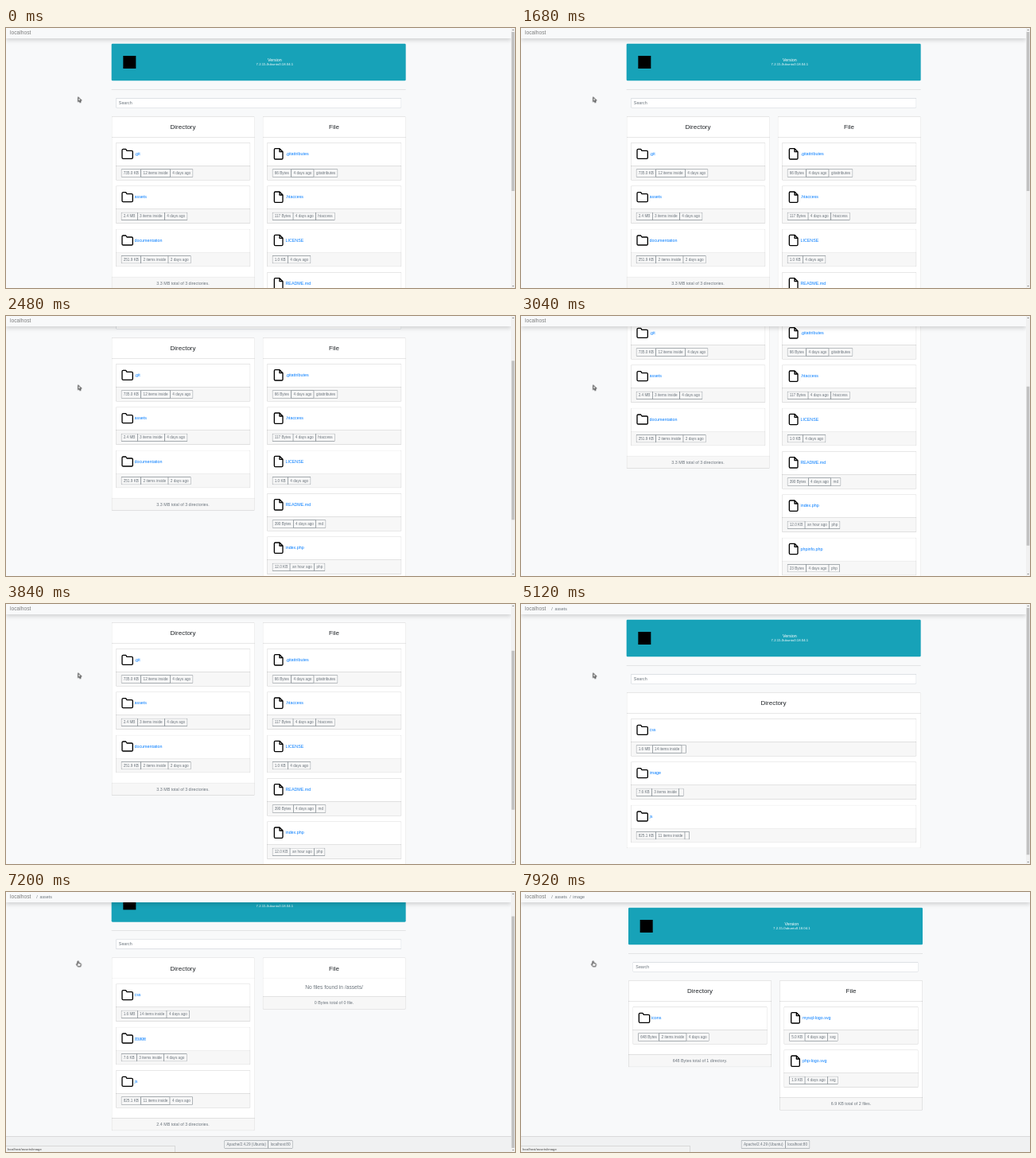
Write an HTML page that moves like this. It is 640 px wide and 327 px high and loops after 8000 ms.

```html
<!DOCTYPE html>
<html lang="en">
<head>
<meta charset="utf-8">
<title>localhost</title>
<style>
@property --scroll { syntax: "<number>"; inherits: true; initial-value: 0; }

html, body { margin: 0; width: 100%; height: 100%; overflow: hidden; background: #f8f9fa; }
/* The browser window is laid out at 1920 x 981 and shown at a third. */
#screen {
  position: absolute; width: 1920px; height: 981px; overflow: hidden;
  transform: scale(.333333); transform-origin: 0 0;
  font: 16px/24px "Liberation Sans", Arial, sans-serif; color: #212529;
  --line: rgba(0, 0, 0, .13);
  animation: scroll 8s step-end infinite;
}
#screen div, #screen nav, #screen svg { position: absolute; box-sizing: border-box; }
.stage { inset: 0; background: #f8f9fa; overflow: hidden; }
.doc { left: 0; top: 0; transform: translateY(calc(var(--scroll) * -1px)); }
.wrap { top: 0; width: 1110px; height: 100%; }

nav { left: 0; top: 0; height: 39px; padding-left: 15px; line-height: 36px; white-space: nowrap;
  background: #f8f9fa; box-shadow: 0 8px 16px rgba(0, 0, 0, .15); color: #6c757d; }
nav b { font-weight: 400; font-size: 20px; color: #7c7d7d; margin-right: 11px; }
nav span { margin-left: 10px; }
nav span::before { content: "/"; margin-right: 8px; }

.banner { top: 59px; width: 100%; height: 140px; border-radius: 4px; background: #17a2b8;
  color: #fff; text-align: center; }
.banner div { left: 416px; width: 400px; }
.banner .logo { left: 44px; top: 46px; width: 48px; height: 48px; background: #000; }
.rule { top: 231px; width: 100%; height: 2px; background: var(--line); }
.search { left: 16px; top: 264px; width: 1078px; height: 38px; padding-left: 12px; line-height: 37px;
  background: #fff; border-radius: 4px; box-shadow: inset 0 0 0 2px #d3d8dd; color: #6c757d; }

.card, .item { background: #fff; border-radius: 4px; box-shadow: inset 0 0 0 2px var(--line); }
.card { top: 333px; }
.card h2 { margin: 0; height: 81px; font: 24px/81px "Liberation Sans", Arial, sans-serif; text-align: center;
  box-shadow: inset 0 -2px var(--line); }
.item { left: 16px; right: 16px; height: 143px; }
.item svg { left: 20px; top: 19px; }
.item a { position: absolute; left: 71px; top: 31px; color: #007bff; }
.foot { left: 0; right: 0; bottom: 0; background: rgba(0, 0, 0, .03); box-shadow: inset 0 2px var(--line);
  color: #6c757d; text-align: center; }
.item .foot { height: 56px; padding: 13px 20px; text-align: left; }
.card > .foot { height: 49px; line-height: 49px; }
.none { top: 99px; width: 100%; text-align: center; font-size: 20px; color: #6c757d; }
.page-foot { height: 60px; padding-top: 16px; }

.group { display: inline-flex; vertical-align: top; white-space: nowrap; }
.group i { font: 14px/31px "Liberation Sans", Arial, sans-serif; height: 31px; padding: 0 9.5px;
  box-shadow: inset 0 0 0 2px #8b9298; color: #6c757d; }
.group i + i { margin-left: -2px; }
.group i:first-child { border-radius: 3px 0 0 3px; }
.group i:last-child { border-radius: 0 3px 3px 0; }

.bar { right: 0; top: 0; width: 15px; height: 981px; background: #f1f1f1; }
.thumb { left: 2px; top: 15px; width: 11px; background: #c1c1c1; }
.arrow { left: 4px; border: 4px solid transparent; }
.up { top: 1px; border-bottom-color: #777; }
.down { bottom: 1px; border-top-color: #777; }

.status { left: -2px; bottom: -2px; width: 641px; height: 25px; padding-left: 5px;
  font-size: 12.8px; line-height: 23px; background: #f1f2f2; border: 2px solid #ccc; color: #444; }
#cursor { left: 0; top: 0; animation: pointer 8s step-end infinite; }
#cursor svg { left: -10px; top: -5px; }
#cursor path { fill: #fff; stroke: #111; stroke-width: 2.5; stroke-linejoin: round; }

/* One percent is one 80 ms tick. */
@keyframes scroll {
  0%   { --scroll: 0; }
  26%  { --scroll: 0; animation-timing-function: steps(5); }
  31%  { --scroll: 252; animation-timing-function: steps(4); }
  35%  { --scroll: 360; animation-timing-function: steps(3); }
  38%  { --scroll: 411; }
  42%  { --scroll: 411; animation-timing-function: steps(2); }
  44%  { --scroll: 320; animation-timing-function: steps(2); }
  46%  { --scroll: 264; }
  63%  { --scroll: 0; }
  73%  { --scroll: 0; animation-timing-function: steps(3); }
  76%  { --scroll: 86; }
  96%, 100% { --scroll: 0; }
}
@keyframes pointer {
  0%   { transform: translate(272px, 261px); }
  8%   { transform: translate(272px, 261px); animation-timing-function: steps(6); }
  14%  { transform: translate(295px, 271px); }
  19%  { transform: translate(295px, 271px); animation-timing-function: steps(2); }
  21%  { transform: translate(363px, 332px); }
  47%  { transform: translate(363px, 332px); animation-timing-function: steps(5); }
  52%  { transform: translate(627px, 507px); animation-timing-function: steps(3); }
  55%  { transform: translate(570px, 460px); animation-timing-function: steps(3); }
  58%  { transform: translate(512px, 390px); }
  59%  { transform: translate(502px, 365px); }
  67%  { transform: translate(502px, 365px); animation-timing-function: steps(4); }
  71%  { transform: translate(491px, 421px); }
  78%  { transform: translate(491px, 421px); animation-timing-function: steps(10); }
  88%, 100% { transform: translate(509px, 557px); }
}
</style>
</head>
<body>
<div id="screen">
  <div class="status" data-show="60 63">localhost/assets</div>
  <div class="status" data-show="89 100"><span data-show="90 100">localhost/assets/image</span></div>
  <div id="cursor">
    <svg data-show="0 59 63 88" width="40" height="40" viewBox="-10 -5 40 40"><path d="M0 0v17l4-4 3 7 3-1-3-7h6z"/></svg>
    <svg data-show="59 63 88 100" width="40" height="40" viewBox="-10 -5 40 40"><path d="M-2 1q2-3 4 0v6l7 2q3 1 2 5l-2 6H-1l-6-8q1-3 5 0z"/></svg>
  </div>
</div>
<script>
const screenEl = document.getElementById('screen');
const ICONS = {
  folder: 'M22 19a2 2 0 0 1-2 2H4a2 2 0 0 1-2-2V5a2 2 0 0 1 2-2h5l2 3h9a2 2 0 0 1 2 2z',
  file: 'M14 2H6a2 2 0 0 0-2 2v16a2 2 0 0 0 2 2h12a2 2 0 0 0 2-2V8zv6h6'
};

// Each entry: name, then its badges.
const pages = [
  {
    crumbs: [], stages: [[2, 0, 63]], hover: ['assets', '59 63'],
    dirs: ['.git|735.0 KB|12 items inside|4 days ago', 'assets|2.4 MB|3 items inside|4 days ago',
      'documentation|251.9 KB|2 items inside|2 days ago'],
    files: ['.gitattributes|66 Bytes|4 days ago|gitattributes', '.htaccess|117 Bytes|4 days ago|htaccess',
      'LICENSE|1.0 KB|4 days ago', 'README.md|390 Bytes|4 days ago|md',
      'index.php|12.0 KB|an hour ago|php', 'phpinfo.php|23 Bytes|4 days ago|php'],
    dirTotal: '3.3 MB total of 3 directories.', fileTotal: '13.6 KB total of 6 files.'
  },
  {
    crumbs: ['assets'], stages: [[0, 63, 65], [1, 65, 66], [2, 66, 96]], hover: ['image', '88 96'],
    dirs: ['css|1.6 MB|14 items inside|4 days ago', 'image|7.6 KB|3 items inside|4 days ago',
      'js|825.1 KB|11 items inside|4 days ago'],
    files: [],
    dirTotal: '2.4 MB total of 3 directories.', fileTotal: '0 Bytes total of 0 file.'
  },
  {
    crumbs: ['assets', 'image'], stages: [[0, 96, 98], [1, 98, 99], [2, 99, 100]],
    dirs: ['icons|648 Bytes|2 items inside|4 days ago'],
    files: ['mysql-logo.svg|5.0 KB|4 days ago|svg', 'php-logo.svg|1.9 KB|4 days ago|svg'],
    dirTotal: '648 Bytes total of 1 directory.', fileTotal: '6.9 KB total of 2 files.'
  }
];

const group = list => `<span class="group">${list.map(t => `<i>${t}</i>`).join('')}</span>`;

function item(entry, i, kind, bare, hover) {
  const [name, ...badges] = entry.split('|');
  if (bare) badges[2] = '';
  const line = hover && hover[0] === name ? ` data-line="${hover[1]}"` : '';
  return `<div class="item" style="top:${99 + 163 * i}px">
    <svg width="48" height="48" viewBox="0 0 24 24" fill="none" stroke="#000" stroke-width="2"
      stroke-linejoin="round"><path d="${ICONS[kind]}"/></svg>
    <a${line}>${name}</a><div class="foot">${group(badges)}</div></div>`;
}

// Bottom edge of a card in the page.
const cardEnd = (n, total) => !total ? 433 + 163 * n : n ? 498 + 163 * n : 529;

function card(left, width, title, body, n, total) {
  return `<div class="card" style="left:${left}px;width:${width}px;height:${cardEnd(n, total) - 333}px">
    <h2>${title}</h2>${body}${total ? `<div class="foot">${total}</div>` : ''}</div>`;
}

// Stage 0: folders only; 1: both columns, dates missing; 2: complete.
function stage(page, level, from, to) {
  const { dirs, files, crumbs, hover } = page;
  const full = level > 0, bare = level < 2;
  const dirTotal = full && page.dirTotal;
  const end = Math.max(cardEnd(dirs.length, dirTotal), full ? cardEnd(files.length, true) : 0);
  const height = Math.max(981, end + 80);
  const scrolls = height > 981;
  const width = scrolls ? 1905 : 1920;
  const k = 951 / height;

  const dirList = dirs.map((d, i) => item(d, i, 'folder', bare, hover)).join('');
  const fileList = files.map((f, i) => item(f, i, 'file', false)).join('') ||
    `<div class="none">No files found in /${crumbs.join('/')}/</div>`;

  return `<div class="stage" data-show="${from} ${to}">
    <div class="doc" style="width:${width}px;height:${height}px">
      <div class="wrap" style="left:${(width - 1110) / 2}px">
        <div class="banner"><div class="logo"></div>
          <div style="top:49px">Version</div>
          <div style="top:67px;font-size:12.8px">7.2.15-0ubuntu0.18.04.1</div></div>
        <div class="rule"></div>
        <div class="search">Search</div>
        ${card(0, full ? 540 : 1110, 'Directory', dirList, dirs.length, dirTotal)}
        ${full ? card(570, 540, 'File', fileList, files.length, page.fileTotal) : ''}
      </div>
      ${full ? `<div class="foot page-foot">${group(['Apache/2.4.29 (Ubuntu)', 'localhost:80'])}</div>` : ''}
    </div>
    <nav style="width:${width}px"><b>localhost</b>${crumbs.map(c => `<span>${c}</span>`).join('')}</nav>
    ${scrolls ? `<div class="bar"><div class="arrow up"></div><div class="arrow down"></div>
      <div class="thumb" style="height:${981 * k}px;transform:translateY(calc(var(--scroll) * ${k}px))"></div></div>` : ''}
  </div>`;
}

// Switches a property on during the given pairs of ticks.
function during(el, spans, prop, off, on) {
  const frames = [{ offset: 0, [prop]: off }];
  spans.split(' ').forEach((tick, i) => frames.push({ offset: tick / 100, [prop]: i % 2 ? off : on }));
  frames.push({ offset: 1, [prop]: frames[frames.length - 1][prop] });
  frames.forEach(f => f.easing = 'step-end');
  el.animate(frames, { duration: 8000, iterations: Infinity });
}

screenEl.insertAdjacentHTML('afterbegin',
  pages.map(p => p.stages.map(s => stage(p, ...s)).join('')).join(''));
document.querySelectorAll('[data-show]').forEach(el =>
  during(el, el.dataset.show, 'visibility', 'hidden', 'visible'));
document.querySelectorAll('[data-line]').forEach(el =>
  during(el, el.dataset.line, 'textDecorationLine', 'none', 'underline'));

// Put every animation on one clock.
requestAnimationFrame(() => {
  const now = document.timeline.currentTime;
  document.getAnimations().forEach(a => a.startTime = now);
});
</script>
</body>
</html>
```
